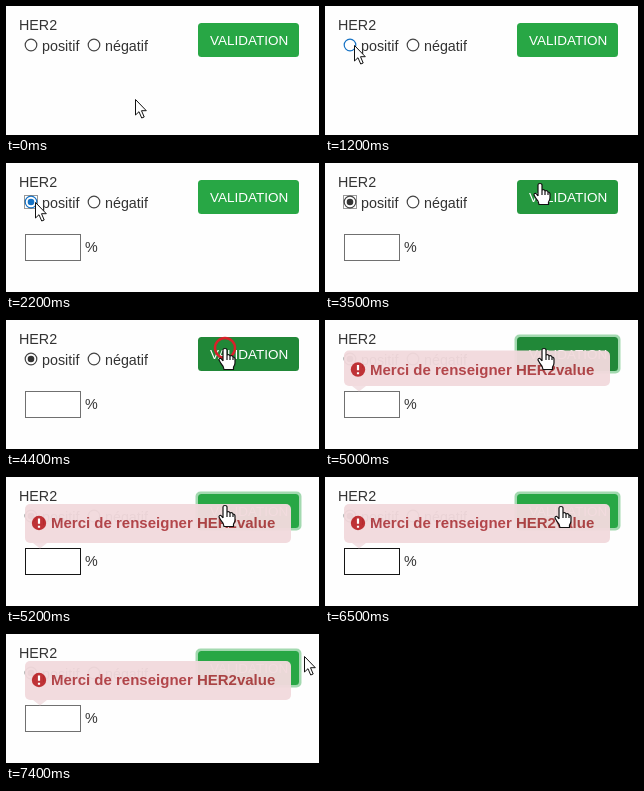
These frames come from a looping animation (313x129 px, 8000 ms). An HTML page:

```html
<!DOCTYPE html>
<html lang="fr">
<head>
<meta charset="utf-8">
<style>
  html, body { margin: 0; width: 100%; height: 100%; overflow: hidden; background: #fefefe; }
  svg { display: block; width: 313px; height: 129px; font: 14.3px "Liberation Sans", Arial, sans-serif; }
</style>
</head>
<body>
<svg viewBox="0 0 313 129">
  <g fill="#333">
    <text x="13" y="24">HER2</text>
    <text x="36" y="45">positif</text>
    <text x="99" y="45">négatif</text>
  </g>
  <g fill="#fff" stroke="#444" stroke-width="1.2">
    <circle id="radio" cx="25" cy="39" r="5.8"/>
    <circle cx="88" cy="39" r="5.8"/>
  </g>
  <circle id="dot" cx="25" cy="39" r="3.3"/>
  <rect id="focus" x="18.5" y="32.5" width="13" height="13" fill="none" stroke="#333" stroke-dasharray="1 1"/>

  <rect id="ring" x="189.5" y="14.5" width="106" height="39" rx="5" fill="#a3d9b0"/>
  <rect id="button" x="192" y="17" width="101" height="34" rx="3.5"/>
  <text x="204" y="39" font-size="13.5" fill="#fff">VALIDATION</text>

  <g id="field">
    <rect id="input" x="19.5" y="71.5" width="55" height="26" fill="#fff"/>
    <text x="79" y="89" fill="#333">%</text>
  </g>

  <g id="tip">
    <path d="M27 66H41L34 71.5Z" fill="#f3e0e3"/>
    <rect id="panel" x="19" width="266" rx="5" fill="#f2dadd"/>
    <g id="message">
      <circle cx="33" cy="19" r="7.2" fill="#bd2a2e"/>
      <path d="M33 14.5V19.8M33 21.8V23.8" stroke="#fff" stroke-width="2.2"/>
      <text x="45" y="24" font-size="15" font-weight="bold" fill="#b03f44">Merci de renseigner HER2value</text>
    </g>
  </g>

  <circle id="click" r="10" fill="none" stroke="#d9202a" stroke-width="2.4"/>
  <g id="cursor" fill="#fff" stroke="#111" stroke-linejoin="round">
    <path id="arrow" d="M.5 .5V16L4 12.7L6.7 19L9.2 18L6.5 11.7H11.3Z"/>
    <path id="hand" stroke-width="1.2" d="M-2 13V2Q-2 .5 0 .5Q2 .5 2 2V7Q4.300 6 5 8Q7.300 7 8 9Q10 9 10 11V15Q10 17 8.500 19V21.500H-1Q-1.500 18 -4 15.500L-6 12Q-6 10 -4 10.500L-2 13M2 7V12M5 8V12M8 9V12"/>
  </g>
</svg>
<script>
const LOOP = 8000, STEP = 100;
const el = id => document.getElementById(id);
const set = (id, attrs) => {
  for (const k in attrs) el(id).setAttribute(k, attrs[k]);
};
const show = (id, on) => set(id, { visibility: on ? 'visible' : 'hidden' });
const ramp = (t, a, b) => Math.min(1, Math.max(0, (t - a) / (b - a)));
const mix = (a, b, k) => a + (b - a) * k;

// time, x, y of the pointer tip
const path = [
  [0, 129, 93], [400, 129, 93], [500, 120, 88], [600, 98, 75], [700, 69, 59], [800, 46, 47],
  [900, 33, 41], [1000, 30, 39], [1100, 30, 39], [1200, 29, 39], [3000, 29, 39],
  [3100, 48, 43], [3300, 140, 31], [3400, 192, 23], [3500, 215, 20], [3700, 219, 28],
  [6400, 219, 28], [6500, 236, 29], [6700, 262, 30], [6900, 282, 26], [7100, 294, 23],
  [7300, 298, 22], [LOOP, 298, 22]
];

function pointer(t) {
  const i = path.findIndex(p => p[0] > t);
  const [t0, x0, y0] = path[i - 1], [t1, x1, y1] = path[i];
  const k = (t - t0) / (t1 - t0);
  return [mix(x0, x1, k), mix(y0, y1, k)];
}

function draw(t) {
  const [x, y] = pointer(t);
  set('cursor', { transform: `translate(${x} ${y})` });
  const overButton = x > 192 && x < 293 && y > 17 && y < 51;
  show('hand', overButton);
  show('arrow', !overButton);

  const press = [1700, 4400].find(p => t >= p && t < p + 200);
  show('click', press);
  set('click', { cx: x, cy: y, opacity: t === press ? 1 : 0.5 });

  const overRadio = t >= 900 && t < 3100;
  const checked = t >= 2100;
  set('radio', { stroke: overRadio ? '#1672c4' : '#444' });
  set('dot', { fill: overRadio ? '#1672c4' : '#333' });
  show('dot', checked);
  show('focus', checked && t < 4400);
  show('field', t >= 2200);
  set('input', { stroke: t >= 5200 && t < 7000 ? '#151515' : '#707070' });

  const hover = ramp(t, 3400, 3600) - ramp(t, 5000, 5200);
  const rgb = [[40, 33], [167, 136], [69, 56]].map(c => Math.round(mix(...c, hover)));
  set('button', { fill: `rgb(${rgb})` });
  show('ring', t >= 4500);

  const top = mix(32, 27, ramp(t, 4800, 5200) ** 1.8);
  set('tip', { opacity: 0.96 * ramp(t, 4400, 4700) });
  set('panel', { y: top, height: 66 - top });
  set('message', { transform: `translate(0 ${top})` });
}

function tick() {
  draw(Math.floor(performance.now() % LOOP / STEP) * STEP);
  requestAnimationFrame(tick);
}
tick();
</script>
</body>
</html>
```
